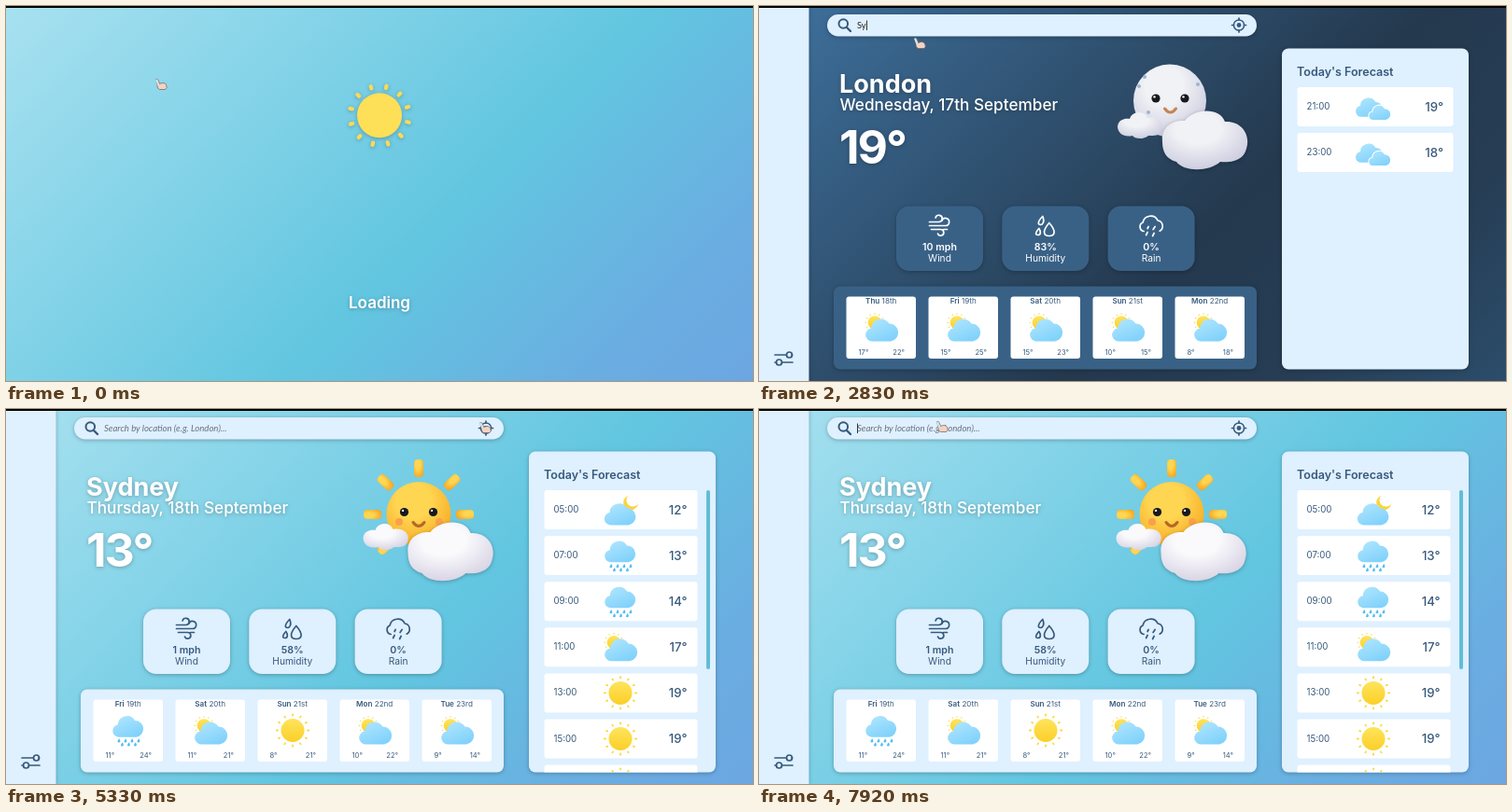
Animation of 800 by 402 pixels, one loop 8 s. Source, as an HTML page:

```html
<!DOCTYPE html>
<html lang="en">
<head>
<meta charset="utf-8">
<title>Weather</title>
<style>
  html, body { margin: 0; height: 100%; overflow: hidden; }
  svg { display: block; width: 100vw; height: 100vh; }
  text { font-family: Inter, sans-serif; }
  .lato { font-family: Lato, sans-serif; }
  .line { fill: none; stroke-width: 1.7; stroke-linecap: round; stroke-linejoin: round; }
  .shadow { filter: drop-shadow(0 1.5px 2px #0004); }
</style>
</head>
<body>
<svg id="stage" viewBox="0 0 800 402"></svg>
<script>
const LOOP = 8000;
const INK = '#37597c', PALE = '#dff0ff';
const $ = id => document.getElementById(id);

const text = (x, y, size, weight, fill, str, anchor = 'start', extra = '') =>
  `<text x="${x}" y="${y}" font-size="${size}" font-weight="${weight}" fill="${fill}" text-anchor="${anchor}" ${extra}>${str}</text>`;
const rect = (x, y, w, h, r, fill, extra = '') =>
  `<rect x="${x}" y="${y}" width="${w}" height="${h}" rx="${r}" fill="${fill}" ${extra}/>`;
const circle = (x, y, r, fill, extra = '') => `<circle cx="${x}" cy="${y}" r="${r}" fill="${fill}" ${extra}/>`;
const at = (x, y, body, scale = 1) => `<g transform="translate(${x} ${y}) scale(${scale})">${body}</g>`;
const line = (color, d) => `<path class="line" stroke="${color}" d="${d}"/>`;
const range = n => [...Array(n).keys()];
const gradient = (id, stops, attrs) => `<linearGradient id="${id}" ${attrs}>` +
  stops.map(([o, c]) => `<stop offset="${o}" stop-color="${c}"/>`).join('') + '</linearGradient>';
const ball = (id, a, b) => `<radialGradient id="${id}" cx=".42" cy=".3" r=".75">
  <stop offset=".35" stop-color="${a}"/><stop offset="1" stop-color="${b}"/></radialGradient>`;

const diagonal = 'gradientUnits="userSpaceOnUse" x1="0" y1="0" x2="601" y2="601"';
const defs = `<defs>
  ${gradient('day', [[0, '#a8e1f0'], [.58, '#62c6e0'], [.84, '#6aaee1'], [1, '#6ca6e2']], diagonal)}
  ${gradient('night', [[0, '#3f729f'], [.6, '#24394e'], [.8, '#263d54'], [1, '#2c4d6b']], diagonal)}
  ${gradient('sky', [[0, '#b3e7ff'], [1, '#82d2fb']], 'x2=".6" y2="1"')}
  ${gradient('gold', [[0, '#ffe45c'], [1, '#fbcf28']], 'x2="0" y2="1"')}
  ${ball('fluff', '#f1f2f5', '#c9c9de')}
  ${ball('white', '#fafafc', '#d5d0e2')}
  ${ball('sunny', '#ffd652', '#f7a61f')}
  <clipPath id="list"><rect x="560" y="80" width="200" height="309.5"/></clipPath>
</defs>`;

// Weather icons, centred on the origin
const cloudPath = 'M-11 14a7 7 0 0 1-1-13.9a10.5 10.5 0 0 1 19.5-5a9.5 9.5 0 0 1 1.5 18.9z';
const cloud = `<path d="${cloudPath}" fill="url(#sky)"/>`;
const rays = (n, r, w, h, fill) => range(n).map(i =>
  rect(-w / 2, -r - h / 2, w, h, w / 2, fill, `transform="rotate(${i * 360 / n})"`)).join('');
const sun = circle(0, 0, 12.5, 'url(#gold)') + rays(12, 16.6, 1.8, 3, '#fcd83c');
const drops = range(7).map(i => {
  const x = -10.5 + i * 3.5, y = i % 2 ? 15 : 11;
  return `<path d="M${x + .8} ${y - 2.2}q2.4 4-.6 4.3q-2.7-.2.6-4.3" fill="#55bdf0"/>`;
}).join('');
const icons = {
  clouds: at(-4, -1, cloud, .84) +
    at(7, 5, `<path d="${cloudPath}" fill="url(#sky)" stroke="#fff" stroke-width="1.5"/>`, .68),
  partly: at(-7, -5, sun, .58) + at(1, 1, cloud),
  rain: at(0, -6, cloud, .94) + drops,
  moon: `<path d="M8-15a8 8 0 1 0 11 9a7 7 0 0 1-11-9z" fill="#fbd53c"/>` + at(0, 3, cloud, .96),
  sun,
};

// Line icons for the measurement tiles
const metrics = [
  ['Wind', 'M-11-4H-1a3.6 3.6 0 1 0-3.4-4.6M-11 0H6a4 4 0 1 0-3.6-5.4M-9 4H1a3.3 3.3 0 1 1-3 4.6M4 4h4'],
  ['Humidity', 'M-3-10c-6 6-5 9-2.5 9s5-3 2.5-9zM4-3c-8 9-6 14 0 14s8-5 0-14zM-7 3c-4 4-4 7-1.2 7s4-3 1.2-7z'],
  ['Rain', 'M-8 6a5 5 0 0 1-1-9.5a8.5 8.5 0 0 1 16-2a6 6 0 0 1 2 11.2M-3 1l-1 2M4 1l-2 3M-4 7l-1.5 3M3 8l-1.5 3'],
];

const bigCloud = 'M432 146C430 128 445 122 456 123C466 110 493 108 499 124C516 123 527 137 522 153C519 166 505 168 494 167C482 178 455 178 447 167C436 164 432 156 432 146Z';
const smallCloud = 'M384 130C384 122 392 120 397 121C400 112 413 112 416 120C426 118 434 124 432 132C430 140 422 139 417 139C411 144 402 142 400 139C391 141 385 137 384 130Z';
const puffs = fill => `<path d="${smallCloud}" fill="${fill}"/><path d="${bigCloud}" fill="${fill}" class="shadow"/>`;
const face = (x, y, mouth) => circle(x - 15.5, y, 4.6, '#17191f') + circle(x + 15.5, y, 4.6, '#17191f') +
  circle(x - 17, y - 1.6, 1.2, '#fff') + circle(x + 14, y - 1.6, 1.2, '#fff') +
  `<path d="M${x - 6} ${y + 11}q6 8 12 0" fill="none" stroke="${mouth}" stroke-width="3" stroke-linecap="round"/>`;

const moonBuddy = circle(440, 101.5, 39, 'url(#fluff)') +
  [[407, 86], [413, 76], [417, 114], [416, 131], [470, 84]].map(([x, y]) => circle(x, y, 2, '#9fb3d0')).join('') +
  face(440.5, 99, '#c58450') + puffs('url(#fluff)');
const sunBuddy = at(442, 113, [-90, -46, 0, 46, 90, 226].map(a =>
    rect(-5, -59, 10, 19, 4, 'url(#sunny)', `transform="rotate(${a})"`)).join('')) +
  circle(442, 112.5, 34.5, 'url(#sunny)') + circle(421, 121, 4, '#f8a04c') + circle(464, 121, 4, '#f8a04c') +
  face(442, 110.5, '#b4692a') + at(-1.5, 9, puffs('url(#white)'));

const cities = {
  london: {
    name: 'London', date: 'Wednesday, 17th September', temp: '19°', bg: 'night', buddy: moonBuddy,
    tile: '#396186', ink: '#fff', values: ['10 mph', '83%', '0%'], rowWidth: 167, tempX: 733,
    days: [['Thu', '18th', 'partly', 17, 22], ['Fri', '19th', 'partly', 15, 25], ['Sat', '20th', 'partly', 15, 23],
      ['Sun', '21st', 'partly', 10, 15], ['Mon', '22nd', 'partly', 8, 18]],
    hours: [['21:00', 'clouds', 19], ['23:00', 'clouds', 18]],
  },
  sydney: {
    name: 'Sydney', date: 'Thursday, 18th September', temp: '13°', bg: 'day', buddy: sunBuddy,
    tile: PALE, ink: INK, values: ['1 mph', '58%', '0%'], rowWidth: 164, tempX: 729.5,
    days: [['Fri', '19th', 'rain', 11, 24], ['Sat', '20th', 'partly', 11, 21], ['Sun', '21st', 'sun', 8, 21],
      ['Mon', '22nd', 'partly', 10, 22], ['Tue', '23rd', 'partly', 9, 14]],
    hours: [['05:00', 'moon', 12], ['07:00', 'rain', 13], ['09:00', 'rain', 14], ['11:00', 'partly', 17],
      ['13:00', 'sun', 19], ['15:00', 'sun', 19], ['17:00', 'sun', 18]],
  },
};

const tile = (city, i) => {
  const x = 147 + i * 113.3, mid = x + 46.5, [label, icon] = metrics[i];
  return rect(x, 214.5, 93, 69.5, 14, city.tile, 'class="shadow"') + at(mid, 235.5, line(city.ink, icon)) +
    text(mid, 261.5, 10.6, 600, city.ink, city.values[i], 'middle') +
    text(mid, 273.5, 10.2, 400, city.ink, label, 'middle');
};
const dayCard = ([day, date, icon, low, high], i) => {
  const x = 93.5 + i * 88;
  return rect(x, 311.5, 74.5, 66.5, 3, '#fff') +
    text(x + 37.2, 318.6, 8.1, 400, INK, `<tspan font-weight="600">${day}</tspan> ${date}`, 'middle') +
    at(x + 37.5, 344.5, icons[icon]) +
    text(x + 13, 373.5, 7.6, 400, INK, low + '°') + text(x + 62.5, 373.5, 7.6, 400, INK, high + '°', 'end');
};
const hourRow = (city, [time, icon, temp], i) => {
  const y = 87 + i * 49.1;
  return rect(576.5, y, city.rowWidth, 42, 3, '#fff') + text(586.5, y + 24, 9.7, 400, INK, time) +
    at(658, y + 21, icons[icon]) + text(city.tempX, y + 25.5, 13.2, 500, INK, temp + '°', 'end');
};

const cityView = (id, c) => `<g id="${id}">
  ${rect(0, 0, 800, 402, 0, `url(#${c.bg})`)}
  <g class="shadow">
    ${text(86, 92.5, 27, 700, '#fff', c.name)}
    ${text(86.5, 112, 17.2, 500, '#fff', c.date)}
    ${text(86, 169, 50, 700, '#fff', c.temp, 'start', 'letter-spacing="-2"')}
  </g>
  ${c.buddy}
  ${range(3).map(i => tile(c, i)).join('')}
  ${rect(80, 300.5, 453, 89, 7, c.tile, 'class="shadow"')}
  ${c.days.map(dayCard).join('')}
  ${rect(560, 45.5, 200, 344, 7, PALE, 'class="shadow"')}
  ${text(576, 74.5, 12.5, 600, INK, "Today's Forecast")}
  <g clip-path="url(#list)">${c.hours.map((h, i) => hourRow(c, h, i)).join('')}</g>
  ${c.hours.length > 6 ? rect(750, 87, 4, 192, 2, '#62bdd6') : ''}
</g>`;

const chrome = `<g id="chrome">
  ${rect(0, 0, 53.5, 402, 0, PALE, 'class="shadow"')}
  ${line(INK, 'M17 374H29M17 382h1.5M24.5 382H36M35 374h.5')}
  ${circle(32.5, 374, 3, 'none', `stroke="${INK}" stroke-width="1.7"`)}
  ${circle(21.5, 382, 3, 'none', `stroke="${INK}" stroke-width="1.7"`)}
  ${rect(73, 9, 460, 23.5, 11.7, PALE, 'class="shadow"')}
  ${circle(90.3, 19, 4.8, 'none', `stroke="${INK}" stroke-width="2"`)}
  <path d="M94 23l4 4" stroke="${INK}" stroke-width="2.4" stroke-linecap="round"/>
  ${circle(514, 20.5, 5.6, 'none', `stroke="${INK}" stroke-width="1.5"`)}${circle(514, 20.5, 2.4, INK)}
  ${line(INK, 'M514 13v2M514 26v2M506.5 20.5h2M519.5 20.5h2')}
  ${text(105, 24, 9.6, 400, '#66727f', 'Search by location (e.g. London)...', 'start', 'id="hint" class="lato" font-style="italic"')}
  ${text(105, 24, 9.4, 400, '#222', '', 'start', 'id="query" class="lato"')}
  ${rect(105, 15.5, .9, 10.5, 0, '#222', 'id="caret"')}
</g>
<g id="toast">
  ${rect(269, 8.5, 262, 23.5, 3, '#fde994', 'class="shadow"')}
  <path d="M287.5 12.5l9 15h-18z" class="line" stroke="#333" style="stroke-width:1.3"/>
  <path d="M287.5 17.5v5M287.5 24.7v.4" class="line" stroke="#333" style="stroke-width:1.3"/>
  ${text(305, 23.6, 9.3, 400, '#35475a', 'Error: Location permissions are not enabled', 'start', 'class="lato"')}
  ${line(INK, 'M514.3 16l7.4 7.4M521.7 16l-7.4 7.4')}
</g>`;

const loading = `<g id="loading">
  ${rect(0, 0, 800, 402, 0, 'url(#day)')}
  <g class="shadow">
    <g id="spinner">${rays(12, 31.3, 4.2, 6.6, '#fbd956')}</g>
    ${circle(400, 117.3, 24, '#fddf58')}
    ${text(400, 324, 17, 600, '#fff', 'Loading', 'middle', 'id="label"')}
  </g>
</g>`;

const pointer = `<g id="pointer">
  <path d="M-5.5-6.5q2-1 3 2l1 3q5-2.500 7 1t-1 5h-6q-3-1-2.500-5z" fill="#f3d3c1" stroke="#6b5d5a" stroke-width=".7"/>
  <path d="M-4.800-5.500l2 5" stroke="#d5e4ee" stroke-width="2" stroke-linecap="round"/>
</g>`;

$('stage').innerHTML = defs + Object.entries(cities).map(([id, c]) => cityView(id, c)).join('') +
  chrome + loading + pointer + rect(0, 0, 800, 2, 0, '#000');

const pointerPath = [[0, 166, 85], [1450, 166, 85], [1700, 171, 22], [2200, 171, 22], [2500, 172, 41],
  [4700, 173, 41], [5350, 514, 21], [5650, 514, 21], [6100, 315, 148], [6900, 315, 148], [7500, 196, 20], [LOOP, 196, 20]];

function pointerAt(t) {
  const i = pointerPath.findIndex(p => p[0] > t);
  const [t0, x0, y0] = pointerPath[i - 1], [t1, x1, y1] = pointerPath[i];
  const u = (t - t0) / (t1 - t0), k = u * u * (3 - 2 * u);
  return [x0 + (x1 - x0) * k, y0 + (y1 - y0) * k];
}

const show = (id, on) => { $(id).style.display = on ? '' : 'none'; };
const within = (t, from, to) => t >= from && t < to;

function draw(t) {
  show('loading', t < 1420 || within(t, 4000, 4250));
  show('london', t < 4000);
  show('sydney', t >= 4000);
  show('toast', within(t, 5600, 6900));

  const phase = t < 4000 ? t : t - 4000;
  $('spinner').setAttribute('transform', `translate(400 117.3) rotate(${13.3 + phase * .0219})`);
  $('label').textContent = 'Loading' + '.'.repeat(Math.floor((phase + 200) / 800));

  const letters = t < 4000 ? Math.max(0, Math.min(6, Math.floor((t - 2500) / 140))) : 0;
  $('query').textContent = 'Sydney'.slice(0, letters);
  show('hint', !letters);
  const focus = t >= 7600 ? 7600 : 2000;
  const blink = within(t, 2500, 3400) || (t - focus) % 1060 < 530 || within(t, 3700, 4000);
  show('caret', (within(t, 2000, 4000) || t >= 7600) && blink);
  $('caret').setAttribute('x', 105 + (letters ? $('query').getComputedTextLength() + .4 : 0));

  $('pointer').setAttribute('transform', `translate(${pointerAt(t)})`);
}

const start = performance.now();
(function tick() {
  draw((performance.now() - start) % LOOP);
  requestAnimationFrame(tick);
})();
</script>
</body>
</html>
```
